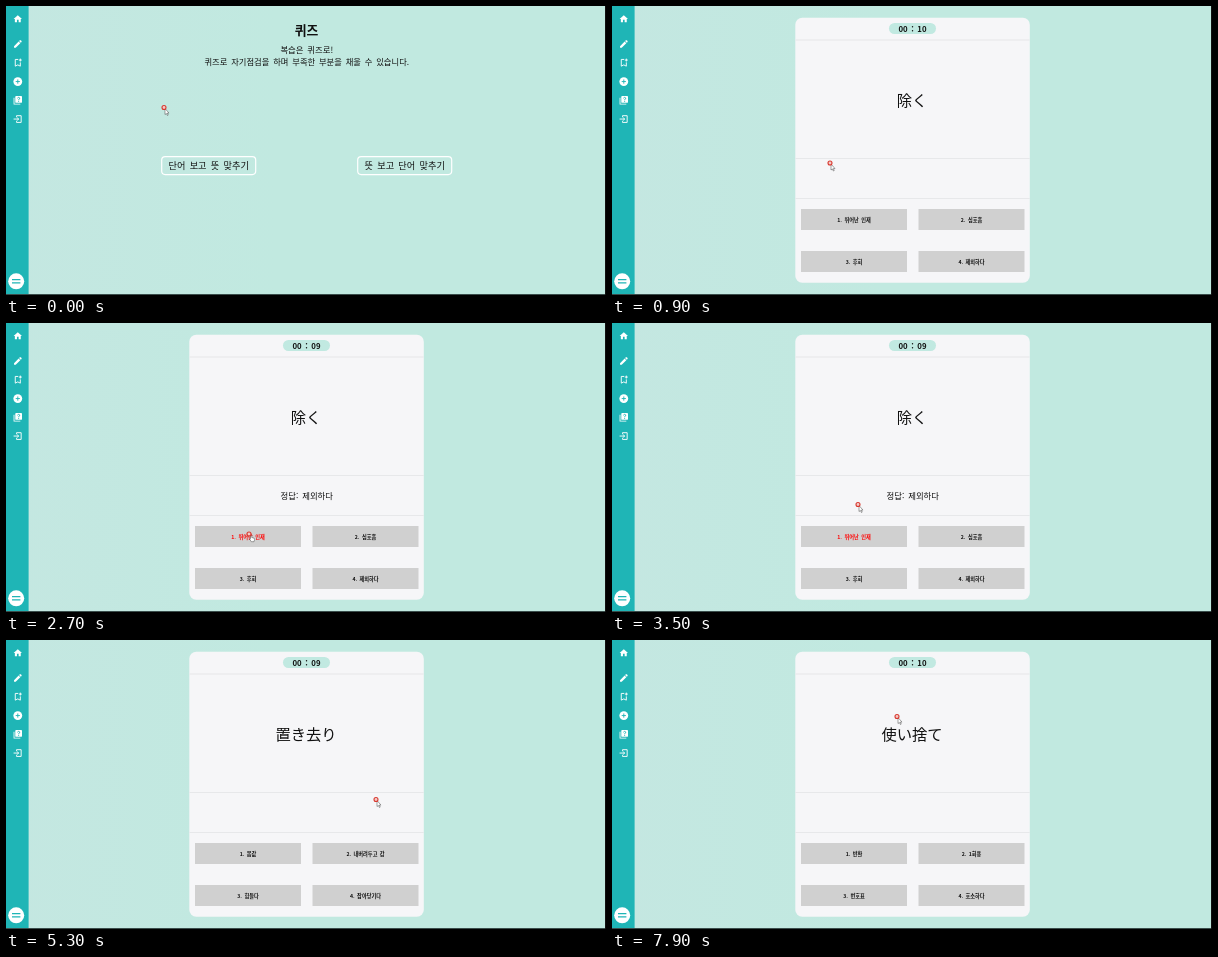
Recreate the animation shown at these times as an HTML page. Size 600x289 px, loop 8 s.

```html
<!DOCTYPE html>
<html lang="ko">
<head>
<meta charset="utf-8">
<title>퀴즈</title>
<style>
html, body { margin: 0; width: 100%; height: 100%; overflow: hidden; background: #c1e9e0; }
svg { display: block; width: 600px; height: 289px; }
text { font-family: "Noto Sans CJK KR", "Noto Sans CJK", sans-serif; text-anchor: middle; word-spacing: .18em; fill: #111; }
#word { font-family: "Noto Sans CJK JP", "Noto Sans CJK", sans-serif; }
.bold { font-weight: 700; }
.line { fill: none; stroke: #fff; stroke-width: 2.2; }
.cut { fill: none; stroke: #1fb5b6; stroke-width: 2.2; }
.button { fill: none; stroke: #fff; stroke-width: 1.2; }
.hover rect { fill: #a8dfe2; }
.hover text { fill: #cbe9e8; }
.pointer { fill: #fff; stroke: #444; stroke-width: .5; }
</style>
</head>
<body>
<svg id="stage" viewBox="0 0 600 289"></svg>
<script>
const rect = (x, y, w, h, fill, r = 0) =>
  `<rect x="${x}" y="${y}" width="${w}" height="${h}" rx="${r}" fill="${fill}"/>`;
const label = (x, y, size, content, attrs = '') =>
  `<text x="${x}" y="${y + size * .37}" font-size="${size}" ${attrs}>${content}</text>`;

const buttons = ['단어 보고 뜻 맞추기', '뜻 보고 단어 맞추기']
  .map((name, i) => ({ name, x: 155.7 + 196 * i, y: 150.6, w: 94, h: 18 }));
const boxes = Array.from({ length: 4 }, (_, i) =>
  ({ x: 189 + 117.5 * (i % 2), y: 203 + 42 * (i >> 1), w: 106, h: 21 }));

// Sidebar symbols on a 24 unit grid
const icons = [
  '<path d="M2 12 12 3l10 9h-3v8h-5v-6h-4v6H5v-8z"/>',
  '<path d="M3 17 14 6l4 4L7 21H3zM15 5l2-2h2l2 2v2l-2 2z"/>',
  '<path class="line" d="M13 4H6v16l6-3 6 3v-9M18 2v7M14.5 5.5h7"/>',
  '<circle cx="12" cy="12" r="10.5"/><path class="cut" d="M12 7v10M7 12h10"/>',
  '<path d="M2 6h2v14h14v2H2z"/><rect x="6" y="2" width="16" height="16" rx="2"/><path class="cut" d="M11 7q3-4 6 0l-3 4v1M14 14v2"/>',
  '<path class="line" d="M9 7V4h11v16H9v-3M2 12h12M10 8l4 4-4 4"/>'
];
const sidebar = icons.map((shape, i) => {
  const y = i ? 19.3 + 18.75 * i : 13;
  return `<g transform="translate(11.8 ${y}) scale(.42) translate(-12 -12)" fill="#fff">${shape}</g>`;
}).join('');

stage.innerHTML = `
<defs><linearGradient id="bg"><stop stop-color="#c4e7e1"/><stop offset=".45" stop-color="#c1e9e0"/></linearGradient></defs>
${rect(0, 0, 600, 289, 'url(#bg)')}
${rect(0, 0, 22.6, 289, '#1fb5b6')}
${sidebar}
<circle cx="10.2" cy="275.3" r="8" fill="#fff"/>
<path d="M6 273.6h8.4M6 276.9h8.4" stroke="#1fb5b6" stroke-width="1.2"/>
<g id="home">
  ${label(300.5, 24, 12.8, '퀴즈', 'class="bold"')}
  ${label(300.8, 44.3, 8.4, '복습은 퀴즈로!')}
  ${label(300.8, 55.6, 8.3, '퀴즈로 자기점검을 하며 부족한 부분을 채울 수 있습니다.')}
  ${buttons.map(({ name, x, y, w, h }, i) => `<g id="button${i}">
    <rect class="button" x="${x}" y="${y}" width="${w}" height="${h}" rx="3.5"/>
    ${label(x + w / 2, y + 9, 9.2, name)}</g>`).join('')}
</g>
<g id="quiz">
  ${rect(183.3, 11.7, 234.5, 265, '#f6f6f8', 7)}
  ${[33.5, 152, 192].map(y => rect(183.3, y, 234.5, 1, '#e7e8ea')).join('')}
  ${rect(277, 17, 47, 11, '#c1e9e1', 5.5)}
  ${label(300.5, 22.7, 7.8, '', 'id="timer" class="bold"')}
  ${label(300, 94, 15.3, '', 'id="word"')}
  ${label(300.8, 173, 8.4, '', 'id="answer"')}
  ${boxes.map(({ x, y, w, h }, i) => rect(x, y, w, h, '#d0d0d0') +
    label(x + w / 2, y + 10.7, 5.2, '', `id="option${i}" class="bold"`)).join('')}
</g>
${rect(0, 288, 600, 1, '#3a4d4b')}
${rect(599, 0, 1, 289, '#111')}
<g id="cursor">
  <path id="arrow" class="pointer" d="M1 1v6l1.400-1 1 2 .8-.4-.9-2H5z"/>
  <path id="hand" class="pointer" d="M1.500 1.500h1.300v2l2.300.6.5 1.400-.6 2.200H2.300L.5 5l1-.3z"/>
  <circle r="2" fill="#f3c9c6" stroke="#d8382f" stroke-width="1.100"/>
</g>`;

const rounds = [
  { start: 900, click: 2700, pick: 0, right: 3, word: '除く', options: ['뛰어난 인재', '심호흡', '후회', '제외하다'] },
  { start: 3800, click: 6400, pick: 1, right: 1, word: '置き去り', options: ['몸값', '내버려두고 감', '힘들다', '잡아당기다'] },
  { start: 7500, click: Infinity, word: '使い捨て', options: ['반환', '1회용', '번호표', '호소하다'] }
];

// Each move glides to x, y and then rests
const origin = { x: 158, y: 101.5 };
const moves = [
  { from: 100, to: 800, x: 218, y: 157 },
  { from: 1000, to: 1900, x: 242, y: 196 },
  { from: 1900, to: 2400, x: 243, y: 211 },
  { from: 2700, to: 3100, x: 246, y: 181.5 },
  { from: 3500, to: 4100, x: 332, y: 129 },
  { from: 4300, to: 4600, x: 346, y: 141 },
  { from: 4800, to: 5300, x: 370, y: 159.5 },
  { from: 5300, to: 6100, x: 340.5, y: 218 },
  { from: 6700, to: 7300, x: 344, y: 105 },
  { from: 7500, to: 7900, x: 285, y: 76.5 }
];

const byId = id => document.getElementById(id);
const show = (id, on) => byId(id).style.display = on ? '' : 'none';
const ease = k => k * k * (3 - 2 * k);

function cursorAt(t) {
  let { x, y } = origin;
  for (const move of moves) {
    const k = ease(Math.max(0, Math.min(1, (t - move.from) / (move.to - move.from))));
    x += (move.x - x) * k;
    y += (move.y - y) * k;
  }
  return { x, y };
}

function drawQuiz(round, t) {
  const done = t >= round.click;
  const seconds = 10 - Math.floor((Math.min(t, round.click) - round.start) / 1000);
  byId('timer').textContent = `00 : ${String(seconds).padStart(2, '0')}`;
  byId('word').textContent = round.word;
  byId('answer').textContent = done ? `정답: ${round.options[round.right]}` : '';
  round.options.forEach((option, i) => {
    const el = byId('option' + i);
    el.textContent = `${i + 1}. ${option}`;
    el.style.fill = done && i === round.pick ? (i === round.right ? '#00f' : '#f00') : '';
  });
}

function draw(now) {
  const t = Math.floor(now % 8000 / 100) * 100;
  const round = rounds.filter(r => r.start <= t).pop();
  const { x, y } = cursorAt(t);
  const over = b => x >= b.x && x <= b.x + b.w && y >= b.y && y <= b.y + b.h;
  const hand = (round ? boxes : buttons).some(over);
  show('home', !round);
  show('quiz', round);
  buttons.forEach((b, i) => byId('button' + i).classList.toggle('hover', over(b)));
  if (round) drawQuiz(round, t);
  byId('cursor').setAttribute('transform', `translate(${x} ${y})`);
  show('hand', hand);
  show('arrow', !hand);
}

const begin = performance.now();
function tick() {
  draw(performance.now() - begin);
  requestAnimationFrame(tick);
}
tick();
</script>
</body>
</html>
```
